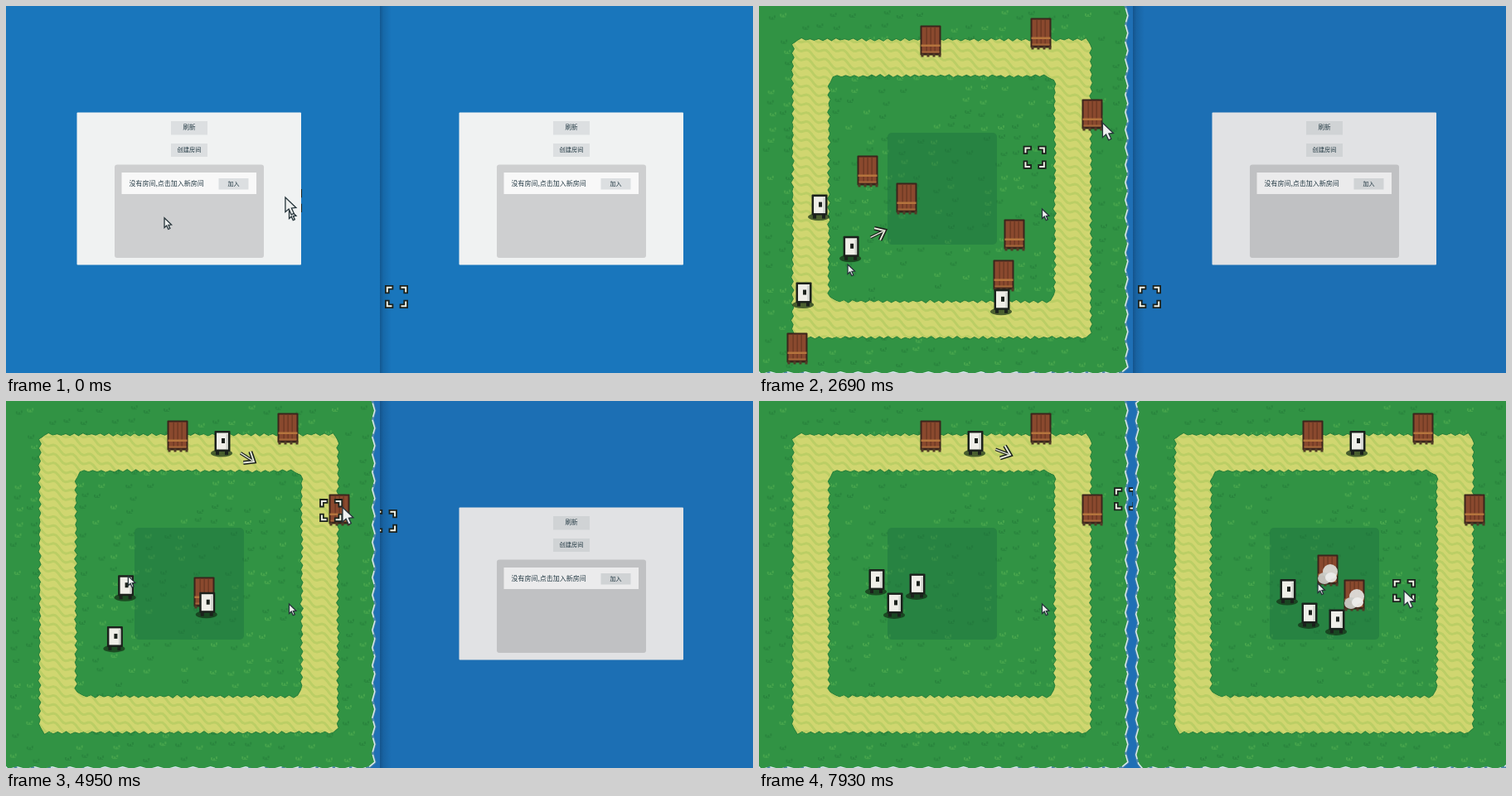
Write an HTML page with a canvas that moves like this. It is 901x443 px and loops after 8000 ms.

```html
<!DOCTYPE html>
<html lang="zh-CN">
<head>
<meta charset="utf-8">
<style>
html, body { margin: 0; width: 100%; height: 100%; overflow: hidden; background: #1c6fb4; }
canvas { display: block; }
</style>
</head>
<body>
<canvas id="stage" width="901" height="443"></canvas>
<script>
const W = 901, H = 443, SPLIT = 451, SHIFT = 461, LOOP = 8000;
const GAME_LEFT = 850, LEFT_PAUSED = 5960, LIST_READY = 6600, GAME_RIGHT = 7300;
const stage = document.getElementById('stage').getContext('2d');
let c = stage;

let seed = 7;
const rnd = () => (seed = (seed * 16807) % 2147483647) / 2147483647;

// Linear interpolation through keys of the form [time, x, y].
function at(keys, t) {
  const i = keys.findIndex(k => t < k[0]);
  if (i < 1) return keys.at(i).slice(1);
  const [t0, x0, y0] = keys[i - 1], [t1, x1, y1] = keys[i], k = (t - t0) / (t1 - t0);
  return [x0 + (x1 - x0) * k, y0 + (y1 - y0) * k];
}

function box(x, y, w, h, color, r = 0) {
  c.fillStyle = color;
  c.beginPath();
  c.roundRect(x, y, w, h, r);
  c.fill();
}

function oval(x, y, rx, ry, color) {
  c.fillStyle = color;
  c.beginPath();
  c.ellipse(x, y, rx, ry, 0, 0, 7);
  c.fill();
}

function line(points, color, width) {
  c.strokeStyle = color;
  c.lineWidth = width;
  c.beginPath();
  points.forEach(p => c.lineTo(...p));
  c.stroke();
}

/* ---------- map ---------- */

// A square with cut corners and a toothed edge.
function raggedSquare(lo, hi, step, amp, noise) {
  const p = new Path2D(), half = (hi - lo) / 2, mid = (lo + hi) / 2;
  for (let side = 0; side < 4; side++) {
    const cos = [1, 0, -1, 0][side], sin = [0, 1, 0, -1][side];
    for (let s = 5, sign = 1; s <= 2 * half - 5; s += step, sign = -sign) {
      const u = s - half, v = -half + sign * amp * (1 - noise * rnd());
      p.lineTo(mid + u * cos - v * sin, mid + u * sin + v * cos);
    }
  }
  p.closePath();
  return p;
}

function tuft(x, y, color) {
  box(x, y, 2, 3, color);
  box(x + 3, y + 1, 2, 3, color);
  box(x + 6, y - 1, 2, 3, color);
  box(x + 1, y + 3, 6, 1, color);
}

function makeMap() {
  const canvas = document.createElement('canvas');
  canvas.width = 480;
  canvas.height = H;
  c = canvas.getContext('2d');
  c.translate(10, 0);
  box(-10, 0, 480, H, '#1f6fb5');

  const shore = raggedSquare(-4, 442.5, 10.6, 1.5, 0);
  c.lineJoin = 'round';
  c.lineWidth = 5;
  c.strokeStyle = '#4f87ab';
  c.stroke(shore);
  c.lineWidth = 3;
  c.strokeStyle = '#dbe9ee';
  c.setLineDash([17, 4]);
  c.stroke(shore);
  c.setLineDash([]);
  c.fillStyle = '#319344';
  c.fill(shore);

  for (let y = 6; y < 434; y += 15)
    for (let x = 4; x < 430; x += 20)
      if (rnd() < 0.7) tuft(x + rnd() * 9, y + rnd() * 7, rnd() < 0.55 ? '#2a863e' : '#46a44c');

  const road = raggedSquare(41, 400, 5.2, 2, 0.7);
  road.addPath(raggedSquare(84, 357, 5.2, 2, 0.7));
  c.lineWidth = 2;
  c.strokeStyle = 'rgba(34,110,50,.5)';
  c.stroke(road);
  c.fillStyle = '#d0d670';
  c.fill(road, 'evenodd');
  c.save();
  c.clip(road, 'evenodd');
  for (let y = -200; y < 400; y += 10.8) {
    const wave = [];
    for (let x = 36; x < 406; x += 3) wave.push([x, y + x / 2 + 3 * Math.sin(x * Math.PI / 10.8)]);
    line(wave, '#bbce65', 3);
  }
  c.restore();

  box(155, 153, 132, 135, 'rgba(24,104,62,.36)', 5);
  c = stage;
  return canvas;
}

/* ---------- sprites ---------- */

const SHADE = 'rgba(18,44,20,.7)', INK = '#1b211c';

function crate([x, y, lift = 0]) {
  if (lift > 0) oval(x, y + 18, 13, 4, SHADE);
  const l = x - 12.5, top = y - lift - 18.5;
  box(l, top, 25, 36, '#3b241b', 1);
  box(l + 2, top + 2, 21, 31, '#8a492e');
  for (const dx of [7, 12, 17]) box(l + dx, top + 2, 1.3, 30, '#6b3822');
  box(l + 1, top + 23, 23, 2.5, '#b5743d');
  box(l + 2, top + 31, 21, 2, '#a4673a');
  for (let dx = 1; dx < 24; dx += 7) box(l + dx, top + 34, 3, 4, '#4f3a26');
}

function walker([x, y]) {
  oval(x - 1, y + 14, 13, 4.5, SHADE);
  box(x - 9.5, y - 13, 19, 25, INK, 1);
  box(x - 8, y + 11, 4, 5, INK);
  box(x + 3, y + 11, 4, 5, INK);
  box(x - 7, y - 10.5, 14, 20, '#efeee8');
  box(x + 4.5, y - 9, 2.5, 18, '#cfd2cc');
  box(x - 1, y - 4, 4, 6, INK);
}

function puff(x, y, k) {
  c.globalAlpha = 1 - k * k;
  oval(x + 3, y - 4, 9, 9, '#dededb');
  oval(x - 4, y + 4, 8, 7, '#c9cbc7');
  oval(x + 4, y + 3, 7, 6, '#ededeb');
  c.globalAlpha = 1;
}

function pointer([x, y], size) {
  const shape = [[0, 0], [0, 17], [4, 13.5], [7, 20], [10, 18.6], [7.2, 12.5], [12.5, 12]];
  c.beginPath();
  shape.forEach(([a, b]) => c.lineTo(x + a * size, y + b * size));
  c.closePath();
  c.fillStyle = '#eef0ef';
  c.fill();
  c.strokeStyle = '#26343a';
  c.lineWidth = 1.3;
  c.stroke();
}

function reticle([x, y]) {
  c.lineCap = 'square';
  for (const [color, width] of [[INK, 5.6], ['#f0f2e6', 2]])
    for (const sx of [-1, 1])
      for (const sy of [-1, 1])
        line([[x + sx * 6.5, y + sy * 11.2], [x + sx * 11.2, y + sy * 11.2], [x + sx * 11.2, y + sy * 6.5]], color, width);
  c.lineCap = 'butt';
}

function aimArrow([px, py], [tx, ty]) {
  c.save();
  c.translate(px, py);
  c.rotate(Math.atan2(ty - py, tx - px));
  c.translate(37, 0);
  for (const [color, width] of [[INK, 5], ['#e8ebdc', 1.9]]) {
    line([[-11, 0], [6, 0]], color, width * 0.75);
    line([[-2, -8], [8, 0], [-2, 8]], color, width);
  }
  c.restore();
}

/* ---------- lobby ---------- */

function label(text, x, y, size, align = 'center') {
  c.font = `500 ${size}px "Noto Sans CJK SC", "Noto Sans CJK", "Noto Sans", sans-serif`;
  c.textAlign = align;
  c.textBaseline = 'middle';
  c.fillStyle = '#243a44';
  c.fillText(text, x, y);
}

function lobby(x, dim, room) {
  const [panel, list, row, button] = dim
    ? ['#e1e2e4', '#c0c1c3', '#ebebec', '#d0d3d5']
    : ['#f0f2f2', '#cecfd0', '#f8f8f8', '#dcdfe1'];
  box(x, 128.5, 270.5, 184, panel, 1);
  box(x + 113.5, 139, 44, 16.5, button);
  box(x + 113.5, 166, 44, 16, button);
  label('刷新', x + 135.5, 146.5, 7.5);
  label('创建房间', x + 135.5, 173.5, 7.3);
  box(x + 45.5, 191.5, 180, 112.5, list, 3);
  box(x + 54, 201, 162.5, 26, row);
  box(x + 171, 208, 36, 13.5, button);
  label('加入', x + 189, 214, 7);
  label(room || '没有房间,点击加入新房间', x + 63, 214, room ? 7.4 : 8, 'left');
  if (room) {
    box(x + 219.5, 192, 6, 112, '#87898b', 2);
    box(x + 219.5, 192, 6, 71, '#dcdddd', 2);
  }
}

/* ---------- motion ---------- */

const mouse = [[-130, 343, 235], [0, 337, 231], [700, 276, 214], [1160, 284, 216], [2560, 332, 183],
  [2690, 414, 141], [2900, 500, 142], [4010, 306, 156], [5300, 443, 118], [5750, 691, 154],
  [6700, 691, 154], [7150, 754, 218], [7350, 754, 218], [7700, 778, 229]];
const guest = [[0, 191, 256], [1160, 226, 127], [2690, 107, 312], [4010, 143, 218],
  [5960, 152, 204], [7200, 466, 250], [7930, 674, 220]];

// The reticle trails the mouse and stays where the mouse last left its pane.
function aimAt(t, inside, start) {
  for (let s = t - 130; s > -150; s -= 10) {
    const p = at(mouse, s);
    if (inside(p[0])) return p;
  }
  return start;
}

const hero = [[2690, 111, 291], [3900, 261, 49]];
const bots = [
  [[1160, 19, 171], [2690, 73, 241], [4010, 147, 229], [5960, 142, 216], [7930, 177, 228]],
  [[1160, 126, 237], [2690, 54, 346], [4010, 101, 322], [5960, 164, 245], [7930, 203, 257]],
  [[1160, 392, 317], [2690, 293, 355], [4010, 291, 266], [5960, 191, 221], [7930, 236, 264]]
];

// x, y, gone, landing time, flight speed
const crates = [
  [207, 42], [340, 33], [402, 131],
  [34, 272, 1900], [308, 276, 3300], [282, 356, 2000], [363, 369, 1600], [46, 413, 3100],
  [131, 199, 3000, 1250, 0.79, 0.23],
  [178, 232, 3300, 2300], [188, 222, 4900, 4100], [239, 231, 5200, 4100],
  [225, 204, LOOP, 7830], [257, 234, LOOP, 7850]
];
const FLIGHT = 150, CARRIED_UNTIL = 3300;

function world(t, clock, player) {
  c.drawImage(map, -10, 0);
  const items = [[crate, crate], [walker, player]].slice(1), puffs = [];
  for (const [x, y, gone = LOOP, land = -LOOP, vx = 0, vy = 0] of crates) {
    if (t < land - FLIGHT || t >= gone) continue;
    const left = Math.max(0, land - t), age = (t - land) / 350;
    items.push([crate, [x - vx * left, y - vy * left, left * 0.17]]);
    if (age > 0 && age < 1) puffs.push([x, y + 6, age]);
  }
  bots.forEach((keys, i) => {
    const [x, y] = at(keys, t);
    items.push([walker, [x, y + 0.6 * Math.sin(clock / 110 + i * 2)]]);
    if (i === 2 && t < CARRIED_UNTIL) items.push([crate, [x + 2, y - 30]]);
  });
  items.sort((a, b) => a[1][1] - b[1][1]).forEach(([draw, p]) => draw(p));
  puffs.forEach(p => puff(...p));
}

function pane(x, w, draw) {
  c.save();
  c.beginPath();
  c.rect(x, 0, w, H);
  c.clip();
  draw();
  c.restore();
}

function render(t) {
  const playing = t >= GAME_LEFT, player = at(hero, t);
  const blue = playing ? '#1c6fb4' : '#1976bc';
  const aimLeft = aimAt(t, x => x < 443), aimRight = aimAt(t, x => x > 457, [471, 351]);

  pane(0, SPLIT, () => {
    if (playing) {
      world(Math.min(t, LEFT_PAUSED), t, player);
      aimArrow(player, aimLeft);
      reticle(aimLeft);
    } else {
      box(0, 0, SPLIT, H, blue);
      reticle(aimLeft);
      lobby(85.5, false);
    }
  });

  pane(SPLIT, W - SPLIT, () => {
    if (t >= GAME_RIGHT) {
      c.translate(SHIFT, 0);
      world(t, t, player);
      c.translate(-SHIFT, 0);
      reticle(aimRight);
      return;
    }
    box(SPLIT, 0, W - SPLIT, H, blue);
    const shade = c.createLinearGradient(SPLIT, 0, SPLIT + 14, 0);
    shade.addColorStop(0, 'rgba(10,50,90,.45)');
    shade.addColorStop(0.3, 'rgba(10,50,90,.2)');
    shade.addColorStop(1, 'rgba(10,50,90,0)');
    box(SPLIT, 0, 14, H, shade);
    reticle(aimRight);
    lobby(546.5, playing, t >= LIST_READY ? 'ocLaOumdjo(1/20)' : '');
  });

  pointer([341.5, 245], 0.68);
  pointer(at(guest, t), 0.68);
  pointer(at(mouse, t), 1.04);
}

const map = makeMap();
function tick() {
  render(performance.now() % LOOP);
  requestAnimationFrame(tick);
}
tick();
</script>
</body>
</html>
```
